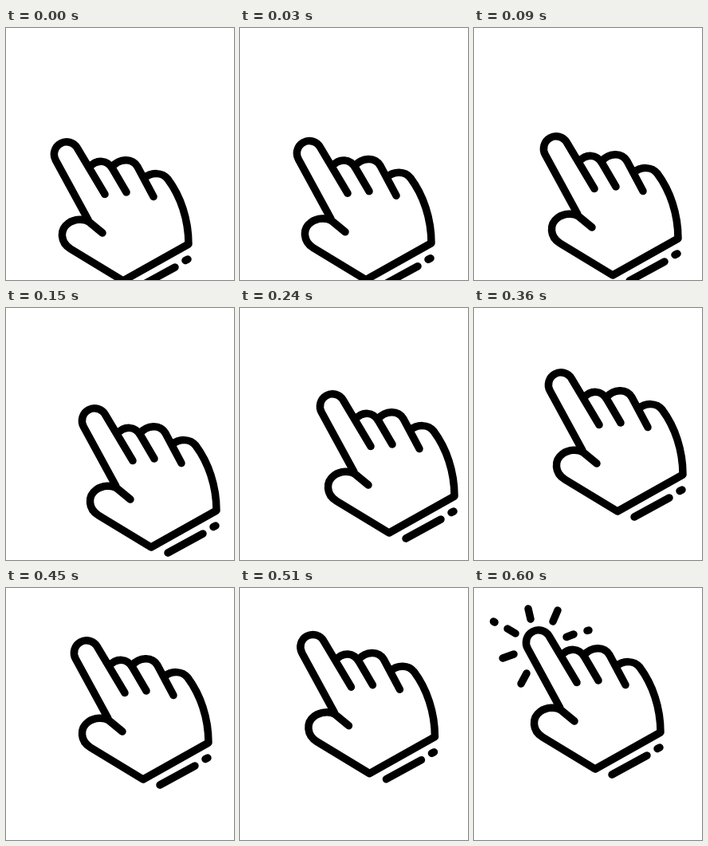
An HTML page with a canvas for the animation above (1500 ms loop, 286 px wide and 316 px high).

```html
<!DOCTYPE html>
<html lang="en">
<head>
<meta charset="utf-8">
<title>Tap gesture</title>
<style>
  html, body { margin: 0; width: 100%; height: 100%; overflow: hidden; background: #fff; }
  canvas { display: block; width: 286px; height: 316px; }
</style>
</head>
<body>
<canvas id="stage" width="286" height="316"></canvas>
<script>
const ctx = document.getElementById('stage').getContext('2d');
const LOOP = 1500, STEP = 30, ARRIVE = 600, TAP = 570;

// Swing of the hand: time, x and y distance from the resting pose
const swing = [
  [0, -5, 90], [90, 22, 83], [150, 30, 73], [240, 35, 55],
  [360, 28, 28], [450, 20, 13], [540, 6, 3], [600, 0, 0]
];

const hand = new Path2D(`
  M108 150.5 L67.4 76 A15.5 15.5 0 0 1 94.5 60.7 L129 118.5
  M109 85 C119 74 132 75 139 87 L156 116
  M138 84 C147 74 163 72 170 84 L190 121.5
  M178 98.5 C187 90.5 201 90.5 208 99.5 C224 121 234 150 234 181
  L152 227 L86 187
  C73 179 72 163 83 155 C91 149 103 149 109 153 L126 167`);

const cuff = new Path2D('M173 234 L217 210 M230 201.5 L233 200');

const rays = new Path2D(`
  M68 26 L71 39 M105 28 L99 42 M42 51 L52 57 M24.5 42 L26 43
  M36 88 L50 83 M66 107 L59 120 M116 61.5 L125 58 M142 53.5 L144 53`);

function slope(i, k) {
  const [a, b] = [swing[i], swing[i + 1]];
  return (b[k] - a[k]) / (b[0] - a[0]);
}

function tangent(i, k) {
  const last = swing.length - 1;
  if (i === 0) return 2 * slope(0, k) - tangent(1, k);
  if (i === last) return 2 * slope(last - 1, k) - tangent(last - 1, k);
  const before = swing[i][0] - swing[i - 1][0];
  const after = swing[i + 1][0] - swing[i][0];
  return (slope(i - 1, k) * after + slope(i, k) * before) / (before + after);
}

// Hermite curve through the swing points
function offset(t, k) {
  if (t >= ARRIVE) return 0;
  const i = swing.findIndex(p => p[0] > t) - 1;
  const a = swing[i], b = swing[i + 1], span = b[0] - a[0];
  const u = (t - a[0]) / span, v = 1 - u;
  return a[k] * (1 + 2 * u) * v * v + b[k] * u * u * (3 - 2 * u)
    + span * u * v * (tangent(i, k) * v - tangent(i + 1, k) * u);
}

function draw(t) {
  ctx.fillStyle = '#fff';
  ctx.fillRect(0, 0, 286, 316);
  ctx.strokeStyle = '#000';
  ctx.lineWidth = 9.5;
  ctx.lineCap = ctx.lineJoin = 'round';
  ctx.save();
  ctx.translate(offset(t, 1), offset(t, 2));
  ctx.stroke(hand);
  ctx.stroke(cuff);
  ctx.restore();
  if (t >= TAP) ctx.stroke(rays);
}

const start = performance.now();
function tick() {
  const t = (performance.now() - start) % LOOP;
  draw(Math.floor(t / STEP) * STEP);
  requestAnimationFrame(tick);
}
tick();
</script>
</body>
</html>
```
